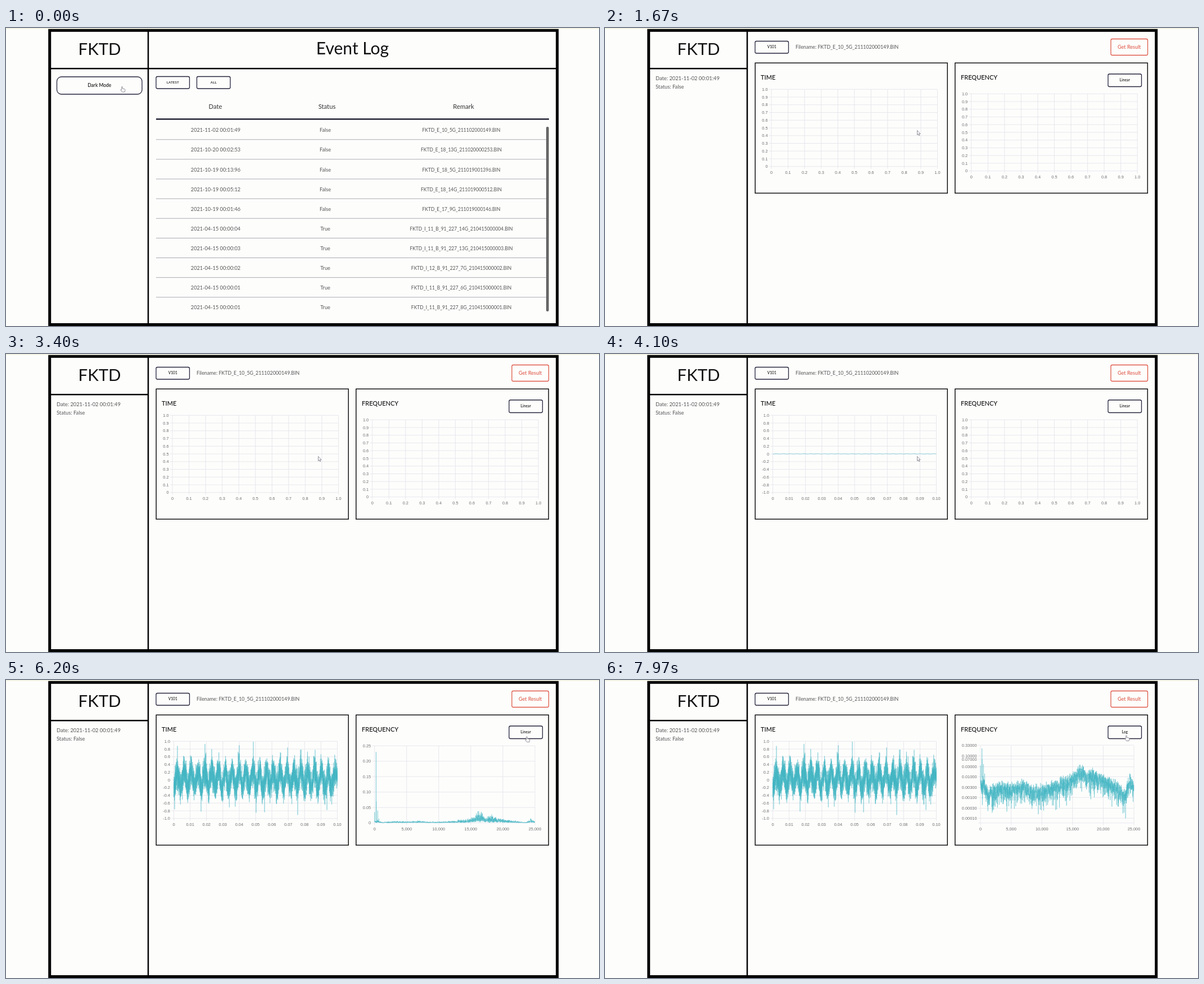
Animation of 1055 by 531 pixels, one loop 8000 ms. Source, as an HTML page:

```html
<!DOCTYPE html>
<html lang="en">
<head>
<meta charset="utf-8">
<title>Event Log</title>
<style>
  html, body { margin: 0; width: 100%; height: 100%; overflow: hidden; background: #fdfdfc; }
  svg { display: block; width: 1055px; height: 531px; font-family: Lato, "Open Sans", sans-serif; }
  .axis { font: 7.4px "Liberation Sans", Arial, sans-serif; fill: #707070; }
  .trace { fill: none; stroke: #45b5c3; stroke-width: .45; stroke-linejoin: bevel; vector-effect: non-scaling-stroke; }
</style>
</head>
<body>
<svg id="stage" viewBox="0 0 1055 531"></svg>
<script>
const LOOP = 8000;
const OPEN_DETAIL = 1300, TIME_DATA = 4100, FREQ_DATA = 4885, LOG_SCALE = 7480;
const BRAND = 'FKTD';
const INK = '#111', BODY = '#555', NAVY = '#24243c', RED = '#df5a4a';
const stage = document.getElementById('stage');

function add(parent, tag, attrs = {}, content) {
  const node = document.createElementNS('http://www.w3.org/2000/svg', tag);
  for (const key in attrs) node.setAttribute(key, attrs[key]);
  if (content !== undefined) node.textContent = content;
  parent.appendChild(node);
  return node;
}
const group = parent => add(parent, 'g');
const label = (parent, x, y, size, content, anchor = 'middle', fill = BODY, weight = 400) =>
  add(parent, 'text', { x, y, 'font-size': size, 'text-anchor': anchor, fill, 'font-weight': weight }, content);
const line = (parent, x1, y1, x2, y2, stroke, width) =>
  add(parent, 'line', { x1, y1, x2, y2, stroke, 'stroke-width': width });
const box = (parent, x, y, width, height, rx, stroke, weight) =>
  add(parent, 'rect', { x, y, width, height, rx, fill: 'none', stroke, 'stroke-width': weight });
function button(parent, x, y, w, h, size, content, color = NAVY, rx = 2.5) {
  box(parent, x, y, w, h, rx, color, 1.3);
  return label(parent, x + w / 2, y + h / 2 + size * .33, size, content, 'middle', color === NAVY ? INK : color, 500);
}
const show = (node, on) => node.setAttribute('display', on ? 'inline' : 'none');
const clamp = v => Math.max(0, Math.min(1, v));
const easeOut = v => 1 - (1 - clamp(v)) ** 4;
const easeInOut = v => { v = clamp(v); return v * v * (3 - 2 * v); };

function randomizer(seed) {
  return () => {
    seed = (seed + 0x6D2B79F5) | 0;
    let n = Math.imul(seed ^ seed >>> 15, 1 | seed);
    n = n + Math.imul(n ^ n >>> 7, 61 | n) ^ n;
    return ((n ^ n >>> 14) >>> 0) / 4294967296;
  };
}

// Window frame
add(stage, 'rect', { width: 1055, height: 531, fill: '#fdfdfc' });
line(stage, 0, 1, 1055, 1, '#f3f3df', 1.5);
box(stage, 77.7, 4.3, 903, 524.2, 0, '#000', 5);
line(stage, 253, 4, 253, 528, '#000', 2.5);
line(stage, 79, 72.3, 253, 72.3, '#000', 2.5);
label(stage, 166.5, 47.5, 29.5, BRAND, 'middle', INK);

// Event list
const list = group(stage);
line(list, 253, 72.3, 979, 72.3, '#000', 2.5);
label(list, 616.5, 47.3, 30, 'Event Log', 'middle', INK);
button(list, 90.5, 87, 151.5, 31, 8.5, 'Dark Mode', NAVY, 8);
button(list, 267, 86.5, 59.5, 21.5, 6.4, 'LATEST');
button(list, 339.5, 86.5, 59.5, 21.5, 6.4, 'ALL');
[[372.5, 'Date'], [571, 'Status'], [814, 'Remark']].forEach(([x, name]) => label(list, x, 144, 11.3, name, 'middle', '#333'));
line(list, 267, 162.3, 966, 162.3, '#0c0c20', 2.2);

const events = [
  ['2021-11-02 00:01:49', 'E_10_5G_211102000149'],
  ['2021-10-20 00:02:53', 'E_18_13G_211020000253'],
  ['2021-10-19 00:13:96', 'E_18_5G_211019001396'],
  ['2021-10-19 00:05:12', 'E_18_14G_211019000512'],
  ['2021-10-19 00:01:46', 'E_17_9G_211019000146'],
  ['2021-04-15 00:00:04', 'I_11_B_91_227_14G_210415000004'],
  ['2021-04-15 00:00:03', 'I_11_B_91_227_13G_210415000003'],
  ['2021-04-15 00:00:02', 'I_12_B_91_227_7G_210415000002'],
  ['2021-04-15 00:00:01', 'I_11_B_91_227_6G_210415000001'],
  ['2021-04-15 00:00:01', 'I_11_B_91_227_8G_210415000001']
];
const fileName = code => `${BRAND}_${code}.BIN`;
events.forEach(([date, code], i) => {
  const y = 185.3 + i * 35.12;
  label(list, 373, y, 9.2, date);
  label(list, 568, y, 9.2, code[0] === 'E' ? 'False' : 'True');
  label(list, 810, y, 8.5, fileName(code));
  if (i < 9) line(list, 267, y + 13.5, 962, y + 13.5, '#a2a2ac', .9);
});
add(list, 'rect', { x: 961, y: 176, width: 4.7, height: 329, rx: 2, fill: '#666' });

// Event detail
const detail = group(stage);
label(detail, 90, 92.5, 9.3, 'Date: ' + events[0][0], 'start');
label(detail, 90, 108, 9.3, 'Status: False', 'start');
button(detail, 267, 23.5, 59.5, 21.5, 6.6, 'V101');
label(detail, 339, 37, 8.8, 'Filename: ' + fileName(events[0][1]), 'start');
button(detail, 900, 19.5, 65.5, 29, 9, 'Get Result', RED);
box(detail, 267.2, 62.3, 342, 232, 0, INK, 1.5);
box(detail, 622.8, 62.3, 342.5, 232, 0, INK, 1.5);
label(detail, 277, 92, 11, 'TIME', 'start', INK, 500);
label(detail, 633, 92, 11, 'FREQUENCY', 'start', INK, 500);
const scaleName = button(detail, 895, 82, 59.5, 22.5, 6.8, 'Linear');

// ticks: [position, text] pairs
function grid(xTicks, yTicks, left, right, top, bottom) {
  const g = group(detail), color = '#e3e3ea';
  xTicks.forEach(([x, text]) => {
    line(g, x, top, x, bottom + 4, color, .8);
    add(g, 'text', { x, y: bottom + 13.4, class: 'axis', 'text-anchor': 'middle' }, text);
  });
  yTicks.forEach(([y, text]) => {
    line(g, left - 4, y, right, y, color, .8);
    add(g, 'text', { x: left - 6.5, y: y + 2.6, class: 'axis', 'text-anchor': 'end' }, text);
  });
  return g;
}
function ticks(count, from, to, format) {
  return Array.from({ length: count + 1 }, (_, i) => [from + (to - from) * i / count, format(i)]);
}
const decimal = (value, digits) => Math.abs(value) < 1e-9 ? '0' : value.toFixed(digits);
const tenths = i => decimal(i / 10, 1);
const hertz = i => (i * 5000).toLocaleString('en-US');

function emptyGrid(left, top) {
  return grid(ticks(10, left, left + 295.5, tenths), ticks(10, top + 137.5, top, tenths), left, left + 295.5, top, top + 137.5);
}
const timeEmpty = emptyGrid(296, 109.3);
const freqEmpty = emptyGrid(651.7, 117.2);
const timeGrid = grid(ticks(10, 298.5, 589.5, i => decimal(i / 100, 2)),
  ticks(10, 246.8, 109.3, i => decimal(i / 5 - 1, 1)), 298.5, 589.5, 109.3, 246.8);
const linearGrid = grid(ticks(5, 655.7, 941, hertz),
  ticks(5, 254.7, 117.2, i => decimal(i / 20, 2)), 655.7, 941, 117.2, 254.7);
const logY = v => Math.min(254.7, 135.3 - 37 * (Math.log10(v) + 1));
const logTicks = [.33, .1, .07, .03, .01, .003, .001, .0003, .0001].map(v => [logY(v), v.toFixed(5)]);
const logGrid = grid(ticks(5, 668, 941, hertz), logTicks, 668, 941, 117.2, 254.7);
line(logGrid, 664, 254.7, 941, 254.7, '#e3e3ea', .8);

// Waveform: a 240 Hz tone buried in noise, with a few strong hits
const SAMPLES = 4800;
const timeTrace = add(detail, 'path', { class: 'trace' });
const rand = randomizer(11);
const noise = () => (rand() + rand() + rand() + rand() - 2) * .33;
const hits = [[300, -.76], [305, .88], [347, -.82], [354, .93], [366, .8], [415, .9], [440, .99],
  [445, -.85], [460, -.84], [501, .84], [519, -.91], [550, .78], [571, -.78]];
const samples = [];
for (let i = 0; i <= SAMPLES; i++) {
  const x = i * 291 / SAMPLES;
  samples.push([x, .02 + .22 * Math.cos(2 * Math.PI * (x - 6.5) / 12.2) + noise()]);
}
hits.forEach(([x, v]) => { samples[Math.round((x - 298.5) * SAMPLES / 291)][1] = v; });
timeTrace.setAttribute('d', 'M' + samples.map(([x, v]) => `${x.toFixed(2)} ${(-v * 68.7).toFixed(1)}`).join('L'));

// Spectrum: [kHz, height on the log scale] shapes the noise floor
const floor = [[0, 186], [.5, 182], [.9, 196], [1.3, 203], [2.5, 194], [4, 191], [5, 194], [7, 187], [8.5, 199],
  [10, 196], [12, 189], [14, 181], [15, 176], [16.4, 161], [17.2, 172], [18.1, 168], [20, 179], [22, 189],
  [23.6, 206], [24.3, 174], [25, 192]];
function floorAt(k) {
  const i = Math.max(1, floor.findIndex(p => p[0] >= k));
  const [k0, y0] = floor[i - 1], [k1, y1] = floor[i];
  return 10 ** ((135.3 - (y0 + (y1 - y0) * (k - k0) / (k1 - k0))) / 37 - 1);
}
const freqTrace = add(detail, 'path', { class: 'trace' });
const spectrum = [];
for (let i = 0; i <= 2400; i++) {
  const k = i / 96;
  spectrum.push([k / 25, floorAt(k) * Math.sqrt(-Math.log(1 - rand() * .995) + .004)]);
}
[[1, .035], [23, .23], [25, .07], [47, .04], [66, .014]].forEach(([i, v]) => { spectrum[i][1] = v; });

function drawSpectrum(grow, morph) {
  const left = morph > 0 ? 668 : 655.7;
  freqTrace.setAttribute('d', 'M' + spectrum.map(([f, v]) => {
    const flat = 254.7 - v * 550 * grow;
    const y = flat + (logY(v) - flat) * morph;
    return `${(left + f * (941 - left)).toFixed(2)} ${y.toFixed(1)}`;
  }).join('L'));
}

// Pointer
const pointer = group(stage);
const shape = { fill: '#fff', stroke: '#777781', 'stroke-width': .8, 'stroke-linejoin': 'round' };
const arrow = add(pointer, 'path', { ...shape, d: 'M0 0V8L1.8 6.4L3 9.2L4.3 8.6L3.1 5.9H5.5Z' });
const hand = add(pointer, 'path', { ...shape, d: 'M-.8 .8Q0-.5 .8 .8V4L4.8 4.8Q5.7 5.2 5.4 6.4L4.6 10H.2L-2.6 6.5Q-2.7 5.2-.8 6.2Z' });
const stops = [[0, 206.5, 104], [150, 206.5, 104], [950, 555.5, 182.5], [5250, 555.5, 182.5],
  [6000, 926.5, 100.5], [6400, 926.5, 100.5], [6700, 927.5, 98.5], [LOOP, 927.5, 98.5]];
function pointerAt(t) {
  const i = stops.findIndex(s => s[0] > t);
  const [t0, x0, y0] = stops[i - 1], [t1, x1, y1] = stops[i];
  const p = easeInOut((t - t0) / (t1 - t0));
  return [x0 + (x1 - x0) * p, y0 + (y1 - y0) * p];
}

function render(t) {
  const opened = t >= OPEN_DETAIL, timed = t >= TIME_DATA, analysed = t >= FREQ_DATA, logged = t >= LOG_SCALE;
  show(list, !opened);
  show(detail, opened);
  show(timeEmpty, !timed);
  show(timeGrid, timed);
  show(timeTrace, timed);
  show(freqEmpty, !analysed);
  show(linearGrid, analysed && !logged);
  show(logGrid, logged);
  show(freqTrace, analysed);
  scaleName.textContent = logged ? 'Log' : 'Linear';
  if (timed) timeTrace.setAttribute('transform', `translate(298.5 178) scale(1 ${easeOut((t - TIME_DATA) / 900)})`);
  if (analysed) drawSpectrum(easeOut((t - FREQ_DATA) / 1000), easeOut((t - LOG_SCALE) / 450));

  const [x, y] = pointerAt(t);
  const clickable = opened ? x > 895 && y < 105 : x < 242 || y > 164;
  show(hand, clickable);
  show(arrow, !clickable);
  pointer.setAttribute('transform', `translate(${x.toFixed(1)} ${y.toFixed(1)})`);
}

const start = performance.now();
function tick() {
  render((performance.now() - start) % LOOP);
  requestAnimationFrame(tick);
}
tick();
</script>
</body>
</html>
```
